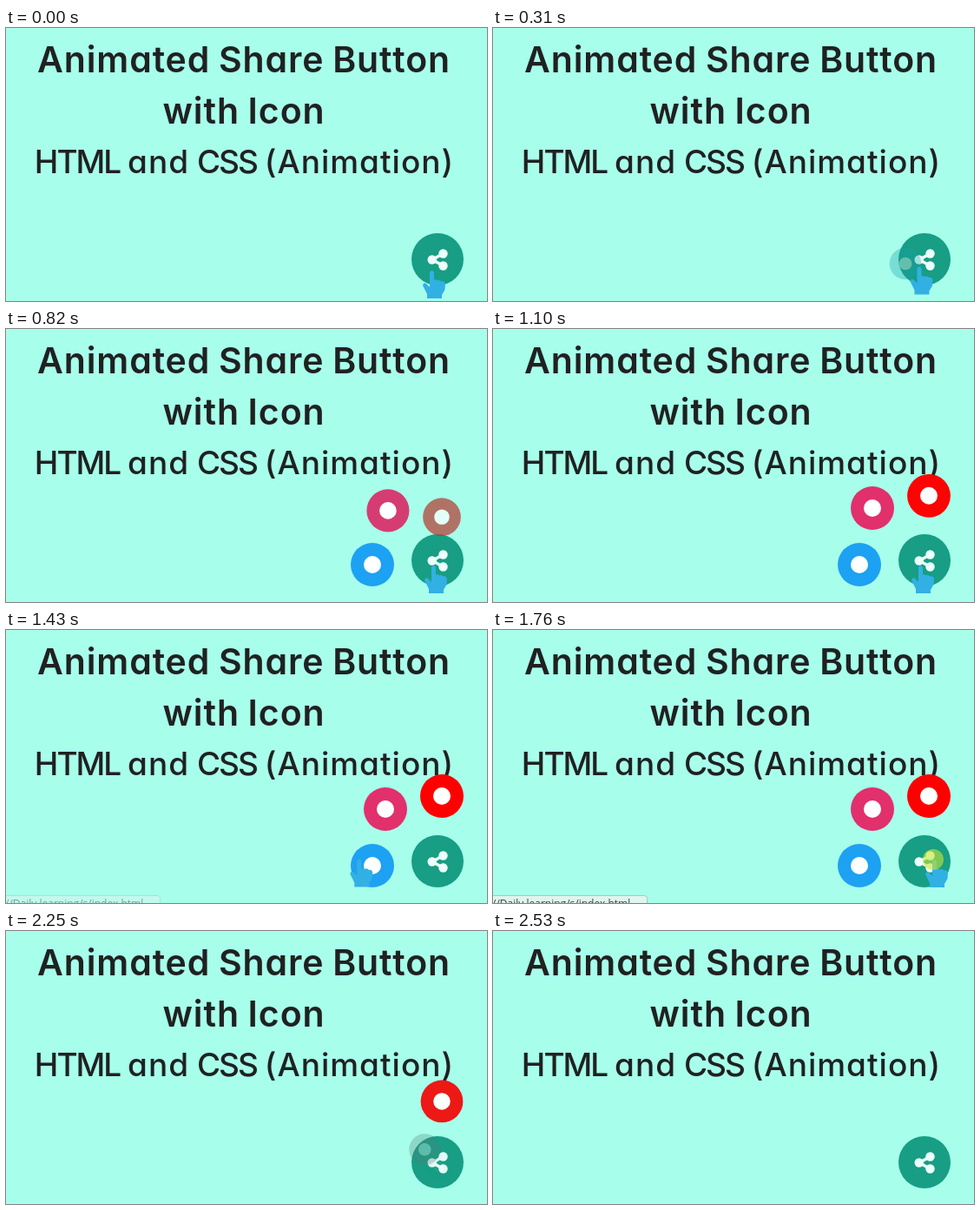
Animation, 554 px wide and 314 px high, one loop 2.68 s. Source, as an HTML page:

```html
<!DOCTYPE html>
<html lang="en">
<head>
<meta charset="utf-8">
<title>Animated Share Button</title>
<style>
  html, body { margin: 0; width: 100%; height: 100%; overflow: hidden; background: #a7ffeb; }
  svg { display: block; width: 554px; height: 314px; }
  text {
    font-family: Inter, "Open Sans", sans-serif;
    font-optical-sizing: none;
    font-feature-settings: "cv11"; /* single-storey a */
    fill: #202121;
  }
  .head, .sub { text-anchor: middle; }
  .head { font-size: 41px; font-weight: 600; letter-spacing: .9px; word-spacing: -1.5px; }
  .sub { font-size: 37px; font-weight: 500; letter-spacing: 1px; word-spacing: -2px; }
  .caps { letter-spacing: -2px; }
  #status text { font: 12px "Open Sans", sans-serif; fill: #444; }
</style>
</head>
<body>
<svg viewBox="0 0 554 314">
  <text class="head" x="274" y="51">Animated Share Button</text>
  <text class="head" x="274" y="110">with Icon</text>
  <text class="sub" x="274.5" y="167"><tspan class="caps">HTML</tspan> and <tspan class="caps">CSS</tspan> (Animation)</text>

  <g transform="translate(497 266)">
    <circle r="30" fill="#179e84"/>
    <path d="M6.500-6.500L-6 .5L6.500 7.500" fill="none" stroke="#ecfffa" stroke-width="3.500"/>
    <g fill="#ecfffa">
      <circle cx="6.500" cy="-6.500" r="5.200"/>
      <circle cx="-6.300" cy=".5" r="5.200"/>
      <circle cx="6.500" cy="7.500" r="5.200"/>
    </g>
  </g>
  <g id="items"></g>

  <g id="status">
    <path d="M-1 305.500H174.500Q177.500 305.500 177.500 308.500V316H-1Z" fill="#dff5ef" stroke="#b4c4c0"/>
    <text x="-1" y="319">//Daily learning/s/index.html</text>
  </g>
  <g id="cursor" fill="#32b0e4">
    <path id="hand" d="M-1 2Q1.500-2 4 2V11Q6 9.500 8 11.500Q10.500 10 12.500 12.500Q16 11.500 17 15L16.500 22L13 28V32H-4V27L-9 17Q-8 12.500-4.500 15.500L-1 19Z"/>
    <path id="arrow" d="M0 0V28L6.500 22L11 32L15.500 30L11 20.500H20Z"/>
    <circle id="press" r="12" fill="#c8e632" opacity=".6"/>
  </g>
</svg>
<script>
const LOOP = 2680, DURATION = 600, STAGGER = 200;
const OPEN = 180, CLOSE = 1805, CLEARED = 2530;
const HOME = [502, 271], GREEN = [22, 160, 133];
const $ = id => document.getElementById(id);

const items = [
  { x: 422, y: 271, color: [29, 161, 242] },
  { x: 437, y: 206, color: [225, 48, 108] },
  { x: 502, y: 191, color: [255, 0, 0] }
];
const hoverAreas = [...items.map(i => [i.x, i.y, 25]), [497, 266, 30]];

// time, x, y of the pointer tip
const path = [
  [0, 489, 279], [30, 489, 278], [100, 489, 275], [540, 490, 274], [820, 491, 272],
  [1110, 491, 272], [1280, 404, 264], [1430, 405, 264], [1540, 436, 202],
  [1640, 498, 184], [1750, 507, 264], [1830, 507, 264], [2070, 523, 287], [2200, 523, 320]
];

const clamp = v => Math.min(1, Math.max(0, v));
const mix = (a, b, p) => a + (b - a) * p;

// cubic-bezier(.25, .1, .25, 1)
function ease(t) {
  t = clamp(t);
  let lo = 0, hi = 1, s = 0;
  for (let i = 0; i < 20; i++) {
    s = (lo + hi) / 2;
    const x = .75 * s * (1 - s) + s ** 3;
    if (x < t) lo = s; else hi = s;
  }
  return .3 * s * (1 - s) ** 2 + 3 * s * s * (1 - s) + s ** 3;
}

function pointerAt(t) {
  const i = path.findIndex(k => k[0] > t);
  if (i < 0) return path[path.length - 1].slice(1);
  const [a, b] = [path[i - 1], path[i]];
  const p = (t - a[0]) / (b[0] - a[0]);
  return [mix(a[1], b[1], p), mix(a[2], b[2], p)];
}

for (const item of items) {
  $("items").insertAdjacentHTML("beforeend",
    '<g><circle r="25"/><circle r="10" fill="#fff"/></g>');
  item.node = $("items").lastChild;
}

function show(node, visible) {
  node.setAttribute("visibility", visible ? "visible" : "hidden");
}

function draw(t) {
  items.forEach(({ x, y, color, node }, i) => {
    const delay = i * STAGGER;
    const opened = ease((t - OPEN - delay) / DURATION);
    const closed = ease((t - CLOSE - delay) / DURATION);
    const p = t < CLEARED ? opened - closed : 0;
    node.setAttribute("transform",
      `translate(${mix(HOME[0], x, p)} ${mix(HOME[1], y, p)}) scale(${mix(.6, 1, p)})`);
    node.setAttribute("opacity", clamp(p));
    node.firstChild.setAttribute("fill", `rgb(${color.map((c, k) => Math.round(mix(GREEN[k], c, p)))})`);
  });

  const [x, y] = pointerAt(t);
  const hovering = hoverAreas.some(([cx, cy, r]) => Math.hypot(x - cx, y - cy) < r);
  $("cursor").setAttribute("transform", `translate(${x} ${y})`);
  show($("hand"), hovering);
  show($("arrow"), !hovering);
  show($("press"), (t >= 110 && t < 210) || (t >= 1740 && t < 1840));

  const fade = clamp((t - 1380) / 100) - clamp((t - 1920) / 120);
  $("status").setAttribute("opacity", fade);
}

const start = performance.now();
function tick() {
  draw((performance.now() - start) % LOOP);
  requestAnimationFrame(tick);
}
tick();
</script>
</body>
</html>
```
